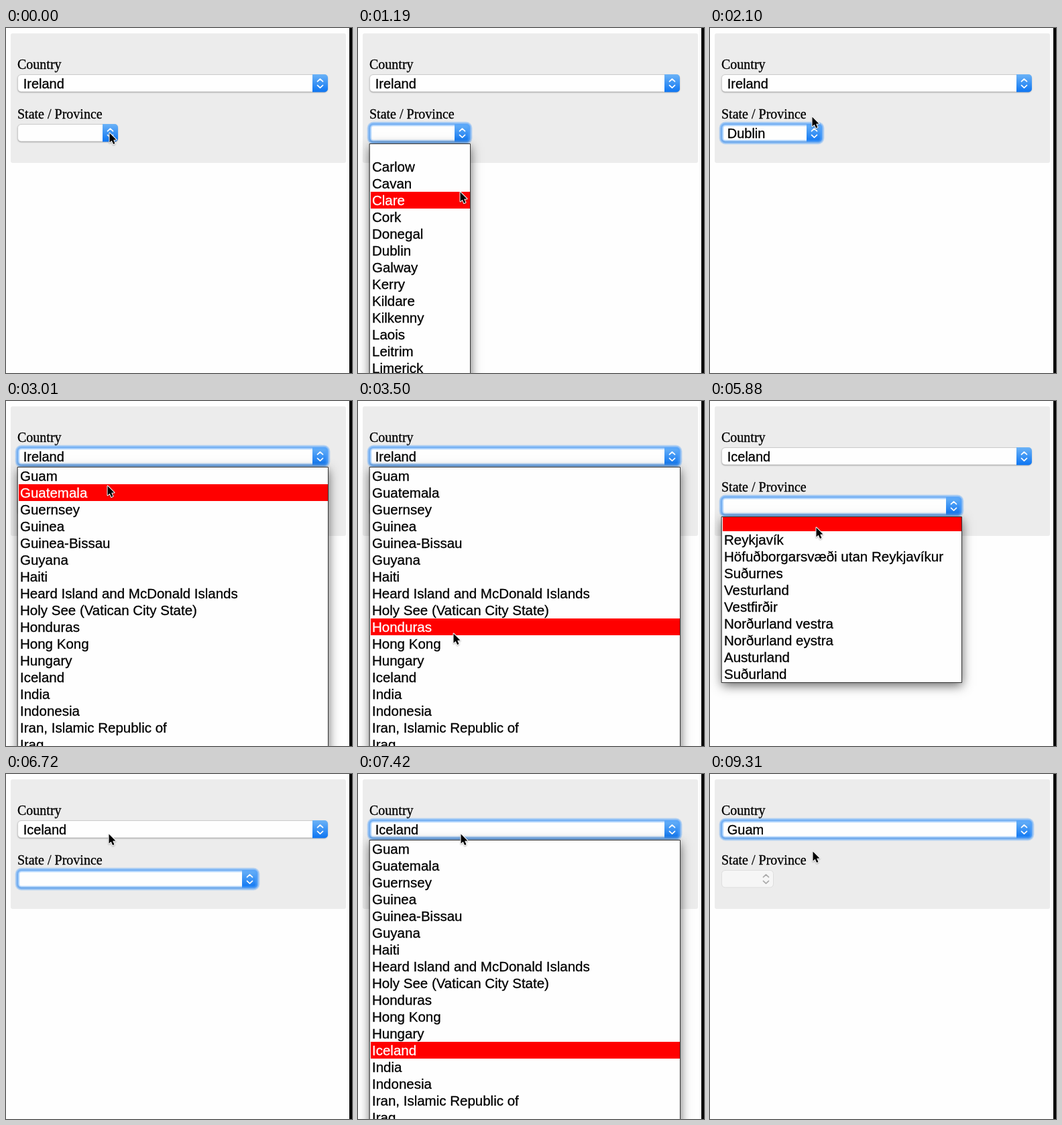
Animation, 516 px wide and 514 px high, one loop 9.87 s. Source, as an HTML page with a canvas:

```html
<!DOCTYPE html>
<html lang="en">
<head>
<meta charset="utf-8">
<title>Country and province</title>
<style>
  html, body { margin: 0; width: 100%; height: 100%; overflow: hidden; background: #fefefe; }
  canvas { display: block; width: 516px; height: 514px; }
</style>
</head>
<body>
<canvas id="stage" width="516" height="514"></canvas>
<script>
const ctx = document.getElementById('stage').getContext('2d');
const LOOP = 9870, TICK = 70, ROW = 25;
const PAPER = '#fefefe', PANEL = '#ececec';
const SANS = '"Liberation Sans", Arial, sans-serif';
const SERIF = '20px "Liberation Serif", Times, serif';

const countries = ['Guam', 'Guatemala', 'Guernsey', 'Guinea', 'Guinea-Bissau', 'Guyana', 'Haiti',
  'Heard Island and McDonald Islands', 'Holy See (Vatican City State)', 'Honduras', 'Hong Kong',
  'Hungary', 'Iceland', 'India', 'Indonesia', 'Iran, Islamic Republic of', 'Iraq', 'Ireland'];

const states = {
  Ireland: { width: 150, items: ['', 'Carlow', 'Cavan', 'Clare', 'Cork', 'Donegal', 'Dublin',
    'Galway', 'Kerry', 'Kildare', 'Kilkenny', 'Laois', 'Leitrim', 'Limerick', 'Longford'] },
  Iceland: { width: 358, items: ['', 'Reykjavík', 'Höfuðborgarsvæði utan Reykjavíkur', 'Suðurnes',
    'Vesturland', 'Vestfirðir', 'Norðurland vestra', 'Norðurland eystra', 'Austurland', 'Suðurland'] },
  Guam: { width: 78, items: [] }
};

// Each visit to a list: which one, when it opens and closes, what is chosen
const visits = [
  { box: 'state', open: 490, close: 1820, pick: 'Dublin' },
  { box: 'country', open: 2520, close: 3920, pick: 'Iceland' },
  { box: 'state', open: 5320, close: 6300, pick: '' },
  { box: 'country', open: 6860, close: 8400, pick: 'Guam' }
];

// Pointer moves; it rests in between
const home = { x: 154, y: 156 };
const moves = [
  { at: 700, dur: 980, x: 150, y: 331 },
  { at: 1820, dur: 385, x: 152, y: 88 },
  { at: 2800, dur: 980, x: 140, y: 410 },
  { at: 3990, dur: 560, x: 150, y: 188 },
  { at: 4830, dur: 350, x: 157, y: 158 },
  { at: 5460, dur: 350, x: 158, y: 188 },
  { at: 6300, dur: 280, x: 153, y: 89 },
  { at: 7770, dur: 560, x: 147, y: 104 },
  { at: 8750, dur: 140, x: 153, y: 115 }
];

function pointerAt(t) {
  let { x, y } = home;
  for (const m of moves) {
    const u = Math.min(1, Math.max(0, (t - m.at) / m.dur));
    const k = u * u * (3 - 2 * u);
    x += (m.x - x) * k;
    y += (m.y - y) * k;
  }
  return { x: Math.round(x), y: Math.round(y) };
}

function formAt(t) {
  const form = { country: 'Ireland', state: '', focus: '', open: null };
  for (const v of visits) {
    if (t < v.open) break;
    form.focus = v.box;
    if (t < v.close) {
      form.open = v;
    } else {
      if (v.box === 'country') form.state = '';
      form[v.box] = v.pick;
    }
  }
  return form;
}

function text(str, x, y, font, color = '#000') {
  ctx.font = font;
  ctx.fillStyle = ctx.strokeStyle = color;
  ctx.lineWidth = .3;
  ctx.fillText(str, x, y);
  ctx.strokeText(str, x, y);
}

function round(x, y, w, h, r) {
  ctx.beginPath();
  ctx.roundRect(x, y, w, h, r);
}

function shadow(color, blur, dy) {
  ctx.shadowColor = color;
  ctx.shadowBlur = blur;
  ctx.shadowOffsetY = dy;
}

function chevrons(cx, cy, color) {
  ctx.strokeStyle = color;
  ctx.lineWidth = 1.7;
  ctx.lineCap = ctx.lineJoin = 'round';
  for (const s of [-1, 1]) {
    ctx.beginPath();
    ctx.moveTo(cx - 4, cy + s * 2.8);
    ctx.lineTo(cx, cy + s * 6.6);
    ctx.lineTo(cx + 4, cy + s * 2.8);
    ctx.stroke();
  }
}

function select(y, w, label, focused, disabled) {
  const x = 17, h = 27;
  ctx.save();
  if (!disabled) shadow('rgba(0,0,0,.4)', 2, 1);
  round(x + .5, y + .5, w - 1, h - 1.5, 5);
  ctx.fillStyle = disabled ? '#f6f6f6' : PAPER;
  ctx.fill();
  ctx.restore();
  ctx.strokeStyle = disabled ? '#dedede' : '#cccccc';
  ctx.lineWidth = 1;
  ctx.stroke();

  if (!disabled) {
    const g = ctx.createLinearGradient(0, y, 0, y + h);
    g.addColorStop(0, '#6cb3f7');
    g.addColorStop(1, '#0b74f2');
    round(x + w - 23, y, 23, h - .5, [0, 5, 5, 0]);
    ctx.fillStyle = g;
    ctx.fill();
  }
  if (focused) {
    for (const [lw, alpha] of [[7, .25], [5, .35], [2.5, .4]]) {
      round(x, y, w, h, 6);
      ctx.lineWidth = lw;
      ctx.strokeStyle = `rgba(80,160,250,${alpha})`;
      ctx.stroke();
    }
  }
  chevrons(x + w - 11.5, y + 13.5, disabled ? '#aaaaaa' : '#fff');
  text(label, 25.7, y + 21, '20px ' + SANS);
}

function popup(y, w, items, chosen, py) {
  const x = 18, blank = items[0] === '';
  const rowTop = i => Math.round(y + 1 + i * ROW - (blank && i ? 4.5 : 0));
  const bottom = rowTop(items.length);
  const hover = items.findIndex((_, i) => py >= rowTop(i) && py < rowTop(i + 1));
  const active = hover < 0 ? items.indexOf(chosen) : hover;

  ctx.save();
  shadow('rgba(0,0,0,.6)', 15, 5);
  ctx.fillStyle = PAPER;
  ctx.fillRect(x, y, w, bottom - y);
  ctx.restore();
  ctx.strokeStyle = '#333';
  ctx.lineWidth = 1;
  ctx.strokeRect(x - .5, y + .5, w, bottom - y);

  items.forEach((item, i) => {
    if (i === active) {
      ctx.fillStyle = '#f00';
      ctx.fillRect(x + 1, rowTop(i), w - 2, rowTop(i + 1) - rowTop(i));
    }
    text(item, 21, rowTop(i) + 20, '20.5px ' + SANS, i === active ? '#fff' : '#000');
  });
}

function pointer({ x, y }) {
  ctx.save();
  ctx.translate(x + .5, y + .5);
  ctx.beginPath();
  ctx.moveTo(0, 0);
  for (const [px, py] of [[0, 14], [3.2, 11.2], [5.6, 16.6], [8, 15.5], [5.7, 10.3], [10, 10]]) {
    ctx.lineTo(px, py);
  }
  ctx.closePath();
  ctx.lineJoin = 'round';
  ctx.lineWidth = 2;
  ctx.strokeStyle = '#fff';
  shadow('rgba(0,0,0,.3)', 2, 1);
  ctx.stroke();
  shadow('transparent', 0, 0);
  ctx.fillStyle = '#000';
  ctx.fill();
  ctx.restore();
}

function draw(t) {
  const form = formAt(t), tip = pointerAt(t);
  const { width, items } = states[form.country];

  ctx.fillStyle = PAPER;
  ctx.fillRect(0, 0, 516, 514);
  round(7, 8, 500, 193, 3);
  ctx.fillStyle = PANEL;
  ctx.fill();

  text('Country', 17, 61, SERIF);
  text('State / Province', 17, 135, SERIF);
  select(69, 463, form.country, form.focus === 'country', false);
  select(143, width, form.state, form.focus === 'state', !items.length);

  if (form.open) {
    if (form.open.box === 'country') popup(98, 463, countries, form.country, tip.y);
    else popup(172, width, items, form.state, tip.y);
  }

  ctx.fillStyle = '#000';
  ctx.fillRect(512, 0, 4, 514);
  pointer(tip);
}

const start = performance.now();
function tick(now) {
  const t = Math.max(0, now - start) % LOOP;
  draw(Math.floor(t / TICK) * TICK);
  requestAnimationFrame(tick);
}
tick(start);
</script>
</body>
</html>
```
